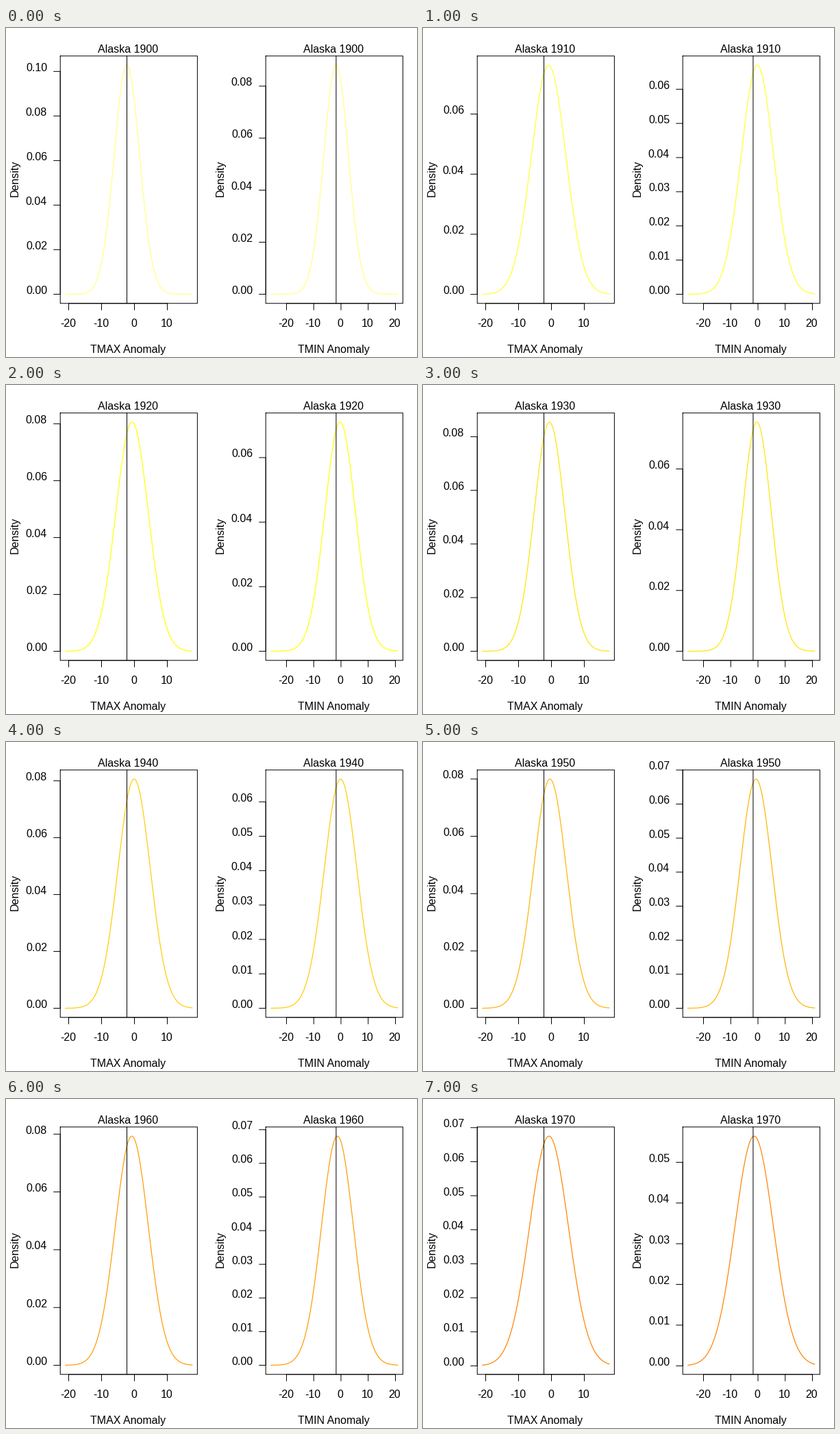
A matplotlib script that plays this animation: 600 px wide and 480 px high, repeating every 8 s.

```python
import colorsys
import math

import matplotlib.pyplot as plt
import numpy as np
from matplotlib.animation import FuncAnimation

W, H, DPI = 600, 480, 100
PX = 72 / DPI
DECADES = 8
plt.rcParams["font.family"] = ["Liberation Sans", "DejaVu Sans"]
plt.rcParams["font.size"] = 16 * PX

# Plot box inside a panel; all margins are multiples of one text line
TEXT_LINE = 19.2
LEFT, RIGHT = 4.1 * TEXT_LINE, 300 - 1.1 * TEXT_LINE
TOP, BOTTOM = 2.1 * TEXT_LINE, H - 4.1 * TEXT_LINE
TICK = TEXT_LINE / 2
PAD = 0.04 / 1.08

# Key decades; the mean and spread are interpolated between them
KEYS = [0, 1, 3, 4, 6, 7]
PANELS = [
    dict(name="TMAX", left=0, zero=187, unit=4.8,
         mean=[-2.29, -0.85, -0.6, -0.1, -0.8, -0.75],
         sd=[3.88, 5.23, 4.67, 4.95, 5.03, 5.91]),
    dict(name="TMIN", left=300, zero=488.5, unit=3.975,
         mean=[-1.78, -0.22, -0.4, -0.15, -1.3, -1.4],
         sd=[4.53, 5.95, 5.29, 5.99, 5.86, 7.07]),
]

fig = plt.figure(figsize=(W / DPI, H / DPI), dpi=DPI, facecolor="white")
ax = fig.add_axes([0, 0, 1, 1])


def line(xs, ys, color="black", width=1.0):
    ax.plot(np.add(xs, 0.5), np.add(ys, 0.5), color=color, lw=width * PX,
            snap=False, solid_capstyle="round", solid_joinstyle="round")


def text(x, y, s, **kw):
    ax.text(x, y, s, va="baseline", **{"ha": "center", **kw})


def heat(i):
    """Pale yellow deepening to yellow, then turning to orange."""
    hue = 60 - 6 * max(i - 2, 0)
    return colorsys.hsv_to_rgb(hue / 360, min(1, 0.5 + i / 3), 1)


def density(x, mean, sd):
    return np.exp(-((x - mean) / sd) ** 2 / 2) / (sd * math.sqrt(2 * math.pi))


def draw_panel(p, i):
    left, right = p["left"] + LEFT, p["left"] + RIGHT
    mid = (left + right) / 2
    pad_x, pad_y = PAD * (right - left), PAD * (BOTTOM - TOP)

    def to_x(v):
        return p["zero"] + p["unit"] * v

    px = np.linspace(left + pad_x, right - pad_x, 300)
    mean, sd = (np.interp(i, KEYS, p[k]) for k in ("mean", "sd"))
    d = density((px - p["zero"]) / p["unit"], mean, sd)
    low, high = d.min(), d.max()

    def to_y(v):
        return np.interp(v, [low - PAD * 1.08 * (high - low),
                             high + PAD * 1.08 * (high - low)], [BOTTOM, TOP])

    line(px, to_y(d), heat(i), 1.2)
    line([left, right, right, left, left], [TOP, TOP, BOTTOM, BOTTOM, TOP])
    line([to_x(p["mean"][0])] * 2, [TOP, BOTTOM])

    ticks = [v for v in range(-20, 21, 10) if to_x(v) < right]
    line([to_x(ticks[0]), to_x(ticks[-1])], [BOTTOM, BOTTOM])
    for v in ticks:
        line([to_x(v)] * 2, [BOTTOM, BOTTOM + TICK])
        text(to_x(v) - 0.5, 436, str(v))

    step = 0.01 if high - low < 0.07 else 0.02
    levels = np.arange(0, high * 1.04, step)
    line([left, left], [to_y(levels[0]), to_y(levels[-1])])
    for v in levels:
        y = to_y(v)
        line([left - TICK, left], [y, y])
        text(left - TEXT_LINE + 0.5, y, f"{v:.2f}", ha="right")

    text(mid - 0.5, 36, f"Alaska {1900 + 10 * i}")
    text(mid - 0.3, 474, f"{p['name']} Anomaly")
    text(p["left"] + 17.5, (TOP + BOTTOM) / 2 - 1, "Density",
         rotation=90, rotation_mode="anchor")


def draw(i):
    ax.clear()
    ax.set_xlim(0, W)
    ax.set_ylim(H, 0)
    ax.axis("off")
    for p in PANELS:
        draw_panel(p, i)
    return ax.get_children()


anim = FuncAnimation(fig, draw, frames=DECADES, interval=1000,
                     repeat=True, repeat_delay=0, blit=False)
plt.show()
```
